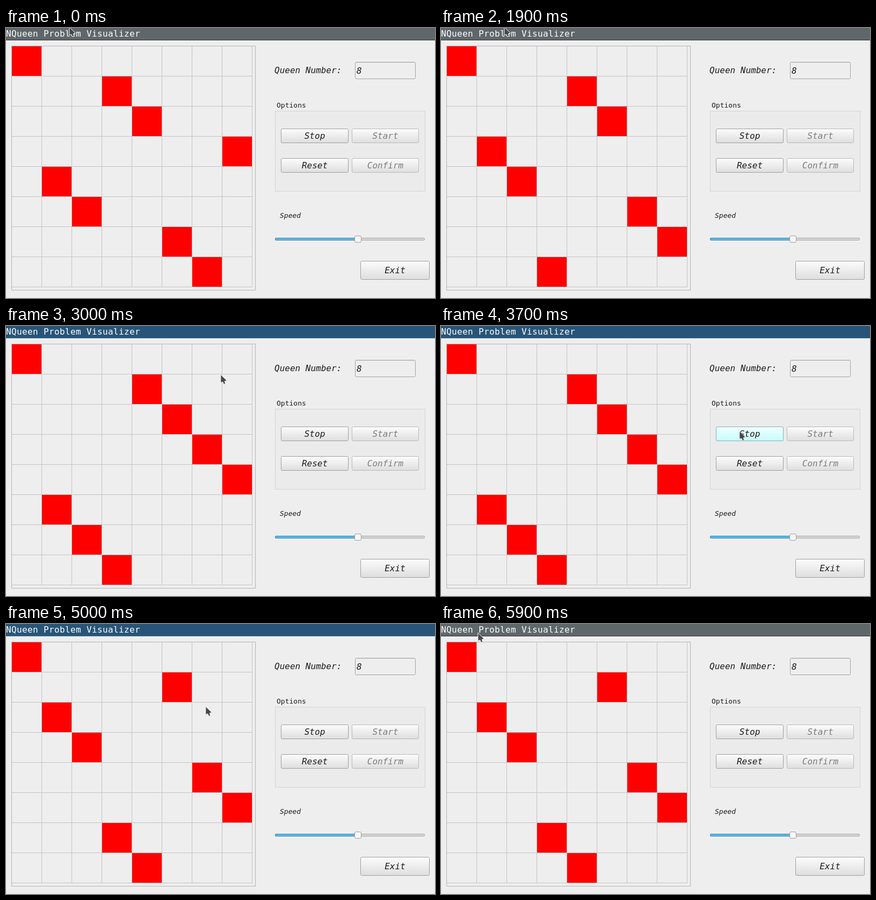
An HTML page that plays this animation: 799 px wide and 502 px high, repeating every 6000 ms.

```html
<!DOCTYPE html>
<html lang="en">
<head>
<meta charset="utf-8">
<title>NQueen Problem Visualizer</title>
<style>
html, body { margin: 0; width: 100%; height: 100%; overflow: hidden; background: #eee; }
svg { display: block; width: 799px; height: 502px; }
text { font: italic 16px "DejaVu Sans Mono", monospace; fill: #1c1c1c; white-space: pre; }
.title { font-style: normal; letter-spacing: .368px; fill: #fff; }
.small { font-size: 13px; }
.upright { font-style: normal; }
.mid text { text-anchor: middle; }
.btn { fill: url(#face); stroke: #9e9e9e; }
.off rect { stroke: #b9b9b9; }
.off text { fill: #7c7c7c; }
.queen { fill: #f00; animation: place 6s step-end infinite; }
.hover { fill: url(#glow); stroke: #7cb4b5; opacity: 0; animation: hover 6s step-end infinite; }
.focus { animation: focus 6s step-end infinite; opacity: 0; }
.cursor { animation: move 6s step-end infinite; }

@keyframes place {
  0%     { transform: translateX(calc(var(--a) * 56px)); }
  15%    { transform: translateX(calc(var(--b) * 56px)); }
  31.66% { transform: translateX(calc(var(--c) * 56px)); }
  50%    { transform: translateX(calc(var(--d) * 56px)); }
  66.66% { transform: translateX(calc(var(--e) * 56px)); }
  83.33%, 100% { transform: translateX(calc(var(--f) * 56px)); }
}
@keyframes hover {
  0% { opacity: 0; }
  61.66% { opacity: 1; }
  83.33%, 100% { opacity: 0; }
}
@keyframes focus {
  0% { opacity: 0; }
  40% { opacity: 1; }
  91.66%, 100% { opacity: 0; }
}
@keyframes move {
  0%     { transform: translate(117px, -3px); }
  40%    { transform: translate(158px, 11px); }
  43.33% { transform: translate(222px, 32px); }
  45%    { transform: translate(338px, 69px); }
  46.66% { transform: translate(399px, 89px); }
  56.66% { transform: translate(415px, 98px); }
  58.33% { transform: translate(455px, 125px); }
  60%    { transform: translate(510px, 163px); }
  61.66% { transform: translate(555px, 194px); }
  63.33% { transform: translate(571px, 205px); }
  83.33% { transform: translate(371px, 152px); }
  85%    { transform: translate(290px, 112px); }
  86.66% { transform: translate(210px, 72px); }
  88.33% { transform: translate(140px, 36px); }
  90%    { transform: translate(95px, 10px); }
  91.66% { transform: translate(70px, -6px); }
  93.33% { transform: translate(56px, -14px); }
  95%    { transform: translate(60px, -14px); }
  98.33%, 100% { transform: translate(68px, 15px); }
}
</style>
</head>
<body>
<svg viewBox="0 0 799 502">
  <defs>
    <linearGradient id="face" x2="0" y2="1">
      <stop stop-color="#fcfcfc"/><stop offset="1" stop-color="#dedede"/>
    </linearGradient>
    <linearGradient id="glow" x2="0" y2="1">
      <stop stop-color="#f4ffff"/><stop offset="1" stop-color="#c4fcfd"/>
    </linearGradient>
    <pattern id="grid" x="11" y="34" width="56" height="56" patternUnits="userSpaceOnUse">
      <path d="M55 0h1v56h-56v-1h55z" fill="#c3c3c3"/>
    </pattern>
  </defs>

  <rect width="799" height="502" fill="#eee"/>

  <!-- title bar -->
  <rect width="799" height="23" fill="#5f676a"/>
  <rect y="22" width="799" height="1" fill="#333"/>
  <g class="focus">
    <rect width="799" height="23" fill="#285577"/>
    <rect y="22" width="799" height="1" fill="#4c7899"/>
  </g>
  <text class="title" x="0" y="16">NQueen Problem Visualizer</text>

  <!-- board -->
  <rect x="10.5" y="33.5" width="454" height="454" fill="none" stroke="#b4b4b4"/>
  <rect x="11" y="34" width="448" height="448" fill="url(#grid)"/>
  <rect class="queen" x="11" y="34" width="55" height="55" style="--a:0;--b:0;--c:0;--d:0;--e:0;--f:0"/>
  <rect class="queen" x="11" y="90" width="55" height="55" style="--a:3;--b:4;--c:4;--d:4;--e:4;--f:5"/>
  <rect class="queen" x="11" y="146" width="55" height="55" style="--a:4;--b:1;--c:5;--d:5;--e:7;--f:1"/>
  <rect class="queen" x="11" y="202" width="55" height="55" style="--a:7;--b:7;--c:1;--d:6;--e:1;--f:2"/>
  <rect class="queen" x="11" y="258" width="55" height="55" style="--a:1;--b:2;--c:2;--d:7;--e:2;--f:6"/>
  <rect class="queen" x="11" y="314" width="55" height="55" style="--a:2;--b:3;--c:6;--d:1;--e:3;--f:7"/>
  <rect class="queen" x="11" y="370" width="55" height="55" style="--a:5;--b:5;--c:7;--d:2;--e:5;--f:3"/>
  <rect class="queen" x="11" y="426" width="55" height="55" style="--a:6;--b:6;--c:3;--d:3;--e:6;--f:4"/>

  <!-- queen count -->
  <text x="500" y="84">Queen Number:</text>
  <rect x="650.5" y="63.5" width="112" height="31" rx="2" fill="#eee" stroke="#a3a3a3"/>
  <path d="M652 64.5h109" stroke="#dcdcdc"/>
  <text x="653" y="85">8</text>

  <!-- options -->
  <text class="small upright" x="504" y="148">Options</text>
  <rect x="501.5" y="154.5" width="279" height="149" fill="#ebebeb" stroke="#d3d3d3"/>
  <g class="mid">
    <rect class="btn" x="512.5" y="187.5" width="125" height="26" rx="2"/>
    <rect class="hover" x="512.5" y="187.5" width="125" height="26" rx="2"/>
    <text x="575" y="206">Stop</text>
    <rect class="btn" x="512.5" y="242.5" width="125" height="26" rx="2"/>
    <text x="575" y="261">Reset</text>
    <g class="off">
      <rect class="btn" x="644.5" y="187.5" width="124" height="26" rx="2"/>
      <text x="706.5" y="206">Start</text>
      <rect class="btn" x="644.5" y="242.5" width="124" height="26" rx="2"/>
      <text x="706.5" y="261">Confirm</text>
    </g>
    <rect class="btn" x="660.5" y="433.5" width="128" height="34" rx="2"/>
    <text x="724.5" y="456">Exit</text>
  </g>

  <!-- speed slider -->
  <text class="small" x="510" y="353">Speed</text>
  <rect x="501.5" y="390.5" width="278" height="4" rx="1.5" fill="#d6d6d6" stroke="#a6a6a6"/>
  <rect x="501.5" y="390.5" width="153" height="4" rx="1.5" fill="#5fbcec" stroke="#3283b3"/>
  <rect x="649.5" y="386.5" width="12" height="12" rx="2.5" fill="#f6f6f6" stroke="#9c9c9c"/>

  <g class="cursor">
    <path d="M2 3V17.2L5.5 16 7.7 20.5 10.6 19.3 9 15 13 13.2Z" fill="#000" opacity=".12"/>
    <path d="M.8 1.3V16.4L4.6 14.9 6.7 19.4 9.8 18.1 8.2 13.9 12.2 12.4Z" fill="#474747" stroke="#fff"/>
  </g>
</svg>
</body>
</html>
```
